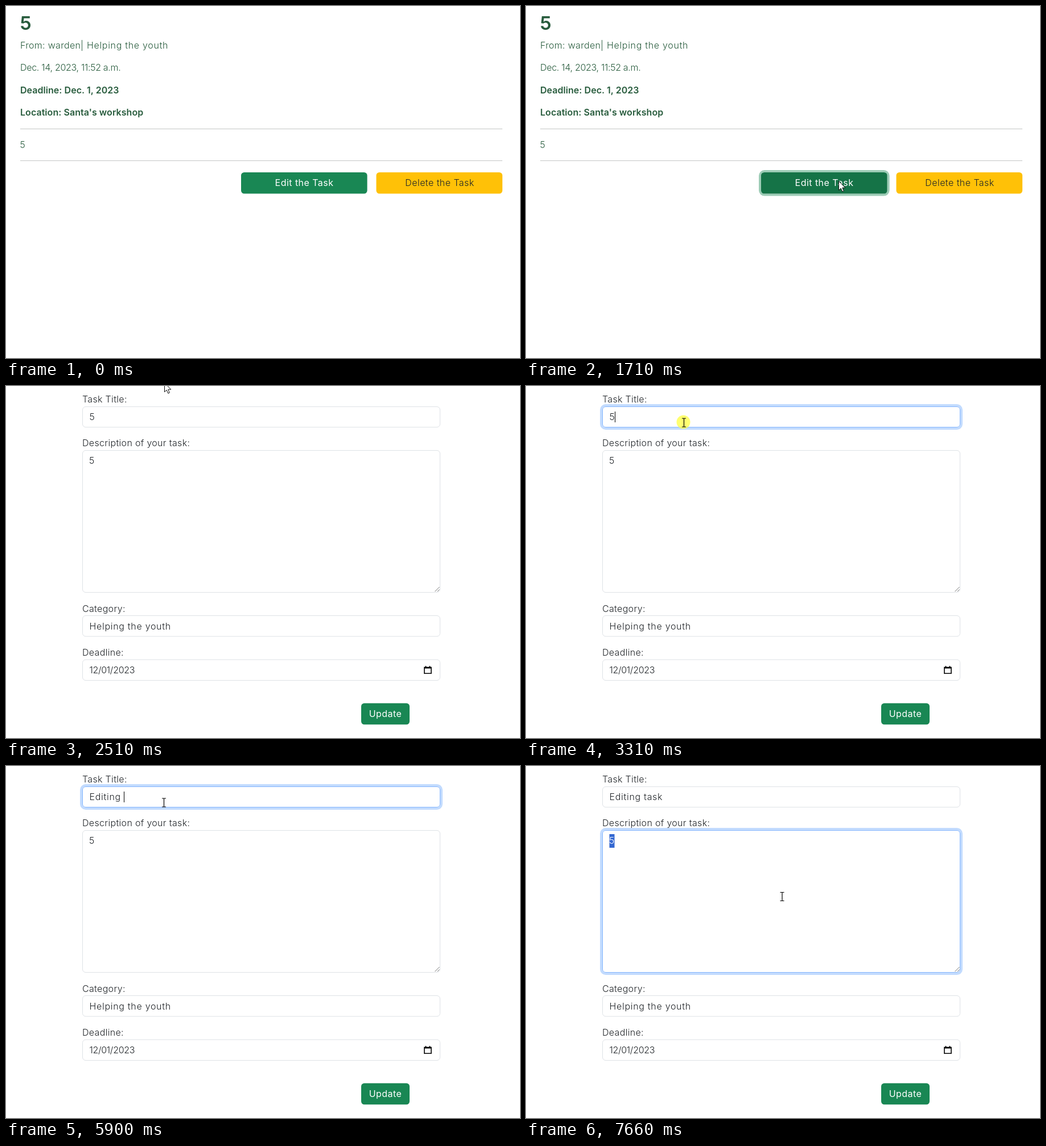
These frames come from a looping animation (903x620 px, 8 s). An HTML page:

```html
<!DOCTYPE html>
<html lang="en">
<head>
<meta charset="utf-8">
<title>Edit a task</title>
<style>
  html, body { margin: 0; width: 100%; height: 100%; overflow: hidden; background: #fff; }
  svg { display: block; width: 100vw; height: 100vh; }
  text { font: 300 16px Inter, "Open Sans", sans-serif; white-space: pre; letter-spacing: .32px; }
  #detail { fill: #275b3c; }
  #form { fill: #212529; }
  .strong { font-weight: 600; letter-spacing: .05px; }
  .wide { letter-spacing: .7px; }
  .num { letter-spacing: -.3px; }
  .mid { text-anchor: middle; letter-spacing: .45px; }
  .light { font-weight: 400; fill: #fff; }
  .title { font-size: 33px; font-weight: 600; }
  .ring { fill: none; }
  .field { fill: #fff; stroke: #dee2e6; }
  .mark { fill: #3367d1; }
</style>
</head>
<body>
<svg viewBox="0 0 903 620">
  <g id="detail">
    <text class="title" x="24.5" y="42">5</text>
    <text x="25" y="74.5">From: warden</text>
    <text class="wide" x="131" y="74.5">| Helping the youth</text>
    <text class="num" x="25" y="114">Dec. 14, 2023, 11:52 a.m.</text>
    <text class="strong" x="25" y="153.5">Deadline: Dec. 1, 2023</text>
    <text class="strong" x="25" y="193">Location: Santa's workshop</text>
    <path d="M25 216.5H872M25 272.5H872" stroke="#c4c6c5"/>
    <text x="24.5" y="250">5</text>
    <rect id="editRing" class="ring"/>
    <rect id="edit" x="413" y="293" width="221.6" height="37.6" rx="5.5"/>
    <text class="mid light" x="524" y="317">Edit the Task</text>
    <rect x="650.5" y="293" width="221.6" height="37.6" rx="5.5" fill="#ffc107"/>
    <text class="mid" x="762" y="317" fill="#212529">Delete the Task</text>
  </g>
  <g id="form">
    <text x="134" y="29">Task Title:</text>
    <text x="134" y="106">Description of your task:</text>
    <text x="134" y="397.5">Category:</text>
    <text x="134" y="474.5">Deadline:</text>
    <rect id="titleRing" class="ring"/>
    <rect id="title" class="field" x="134.5" y="36.5" width="628" height="36" rx="5.5"/>
    <rect id="bodyRing" class="ring"/>
    <rect id="body" class="field" x="134.5" y="113.5" width="628" height="250" rx="5.5"/>
    <path d="M753.5 362L761.5 354M758 362L761.5 358.5" stroke="#777"/>
    <rect class="field" x="134.5" y="404.5" width="628" height="36.5" rx="5.5"/>
    <rect class="field" x="134.5" y="482" width="628" height="36.5" rx="5.5"/>
    <rect id="titleMark" class="mark" x="147" y="43" width="9" height="23"/>
    <rect id="bodyMark" class="mark" x="146.5" y="120" width="9" height="24"/>
    <text id="titleText" class="wide" x="146.5" y="60"></text>
    <text id="bodyText" x="146" y="137">5</text>
    <text class="wide" x="146.5" y="428.5">Helping the youth</text>
    <text class="num" x="146.5" y="505.5">12/01/2023</text>
    <path d="M735 495.5H747V506.3H735ZM735 496.7H747M737.5 495V493M744.5 495V493"
      fill="none" stroke="#000" stroke-width="1.6"/>
    <rect x="624" y="558.7" width="85" height="37.6" rx="5.5" fill="#198754"/>
    <text class="mid light" x="666.5" y="583">Update</text>
    <rect id="caret" width="1" height="19" fill="#000"/>
  </g>
  <circle id="click" r="12" fill="#ffff40" fill-opacity=".75"/>
  <path id="arrow" d="M.5 .5V16.5L4.2 13.1 6.8 19 9.3 17.9 6.8 12.1H11.8Z" fill="#fff" stroke="#111"/>
  <path id="beam" d="M-3.5-7.5H3.5M0-7.5V7.5M-3.5 7.5H3.5" fill="none" stroke="#000" stroke-width="1.2"/>
</svg>
<script>
const LOOP = 8000, FORM_AT = 1750;
const $ = id => document.getElementById(id);
const show = (id, on) => $(id).setAttribute('visibility', on ? 'visible' : 'hidden');
const set = (id, attrs) => { for (const k in attrs) $(id).setAttribute(k, attrs[k]); };
const ease = (t, start, end) => {
  const u = Math.min(1, Math.max(0, (t - start) / (end - start)));
  return u * u * (3 - 2 * u);
};
const within = (t, start, end) => t >= start && t < end;
const mix = (a, b, p) => `color-mix(in srgb, ${b} ${p * 100}%, ${a})`;

// Cursor moves: start, end, x, y
const moves = [[650, 1410, 549, 308], [2140, 2510, 278, -6], [2610, 2900, 277.5, 64.5], [6830, 7250, 450, 230]];
const clicks = [[1480, 1650], [3100, 3330], [7290, 7420]];
// Times at which each letter of the new title is typed
const word = 'Editing task';
const keys = [4630, 5160, 5290, 5440, 5550, 5660, 5780, 5900, 6030, 6230, 6300, 6370];

function pointer(t) {
  let x = 682, y = 478;
  for (const [start, end, toX, toY] of moves) {
    const p = ease(t, start, end);
    x += (toX - x) * p;
    y += (toY - y) * p;
  }
  return [x, y];
}

// Soft outline that grows around a control
function glow(id, x, y, w, h, p, color) {
  const s = 4 * p;
  set(id + 'Ring', {
    x: x - s / 2, y: y - s / 2, width: w + s, height: h + s, rx: 6 + s / 2,
    stroke: color, 'stroke-width': s, 'stroke-opacity': p
  });
}

function focus(id, y, h, p) {
  glow(id, 134, y, 629, h, p, '#c2dbfe');
  $(id).style.stroke = mix('#dee2e6', '#86b7fe', p);
}

function draw(t) {
  const onForm = t >= FORM_AT;
  $('detail').style.display = onForm ? 'none' : '';
  $('form').style.display = onForm ? '' : 'none';

  const pressed = within(t, 1480, 1600);
  $('edit').style.fill = pressed ? '#146c43' : mix('#198754', '#157347', ease(t, 1200, 1350));
  glow('edit', 413, 293, 221.6, 37.6, ease(t, 1470, 1620), '#9dccb6');

  const leave = ease(t, 7285, 7435);
  focus('title', 36, 37, ease(t, 3090, 3240) * (1 - leave));
  focus('body', 113, 251, leave);

  const typed = keys.filter(k => t >= k).length;
  const titleMarked = within(t, 3770, keys[0]), bodyMarked = t >= 7660;
  $('titleText').textContent = typed ? word.slice(0, typed) : '5';
  $('titleText').style.fill = titleMarked ? '#fff' : '';
  $('bodyText').style.fill = bodyMarked ? '#fff' : '';
  $('titleMark').style.display = titleMarked ? '' : 'none';
  $('bodyMark').style.display = bodyMarked ? '' : 'none';

  const inBody = t >= 7290;
  const caretOn = within(t, 3100, 3770) || within(t, keys[0], 6900) || within(t, 7290, 7660);
  $('caret').style.display = caretOn ? '' : 'none';
  if (onForm) {
    const width = $(inBody ? 'bodyText' : 'titleText').getComputedTextLength();
    set('caret', { x: Math.round(146 + width), y: inBody ? 122 : 45 });
  }

  const [x, y] = pointer(t);
  const overText = onForm && x > 134 && x < 763 && (within(y, 36, 73) || within(y, 113, 364));
  show('arrow', t >= 650 && !overText);
  show('beam', overText);
  show('click', clicks.some(([start, end]) => within(t, start, end)));
  set('arrow', { transform: `translate(${x} ${y})` });
  set('beam', { transform: `translate(${x} ${y})` });
  set('click', { cx: x - 1, cy: y - 1 });
}

function tick(now) {
  draw(now % LOOP);
  requestAnimationFrame(tick);
}
requestAnimationFrame(tick);
</script>
</body>
</html>
```
